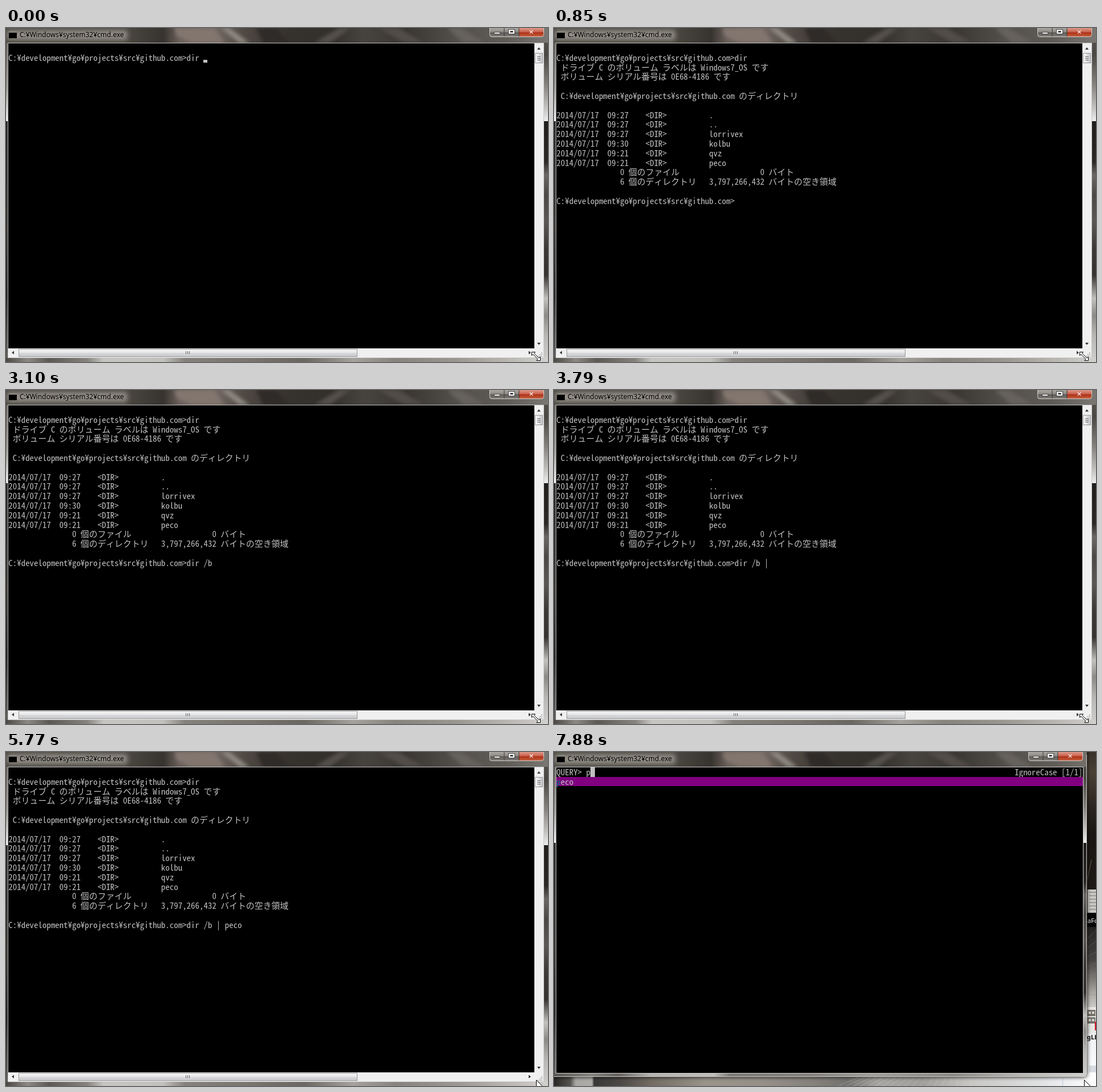
Animation of 953x588 px, one loop 8000 ms. Source, as an HTML page with a canvas:

```html
<!DOCTYPE html>
<html lang="ja">
<head>
<meta charset="utf-8">
<style>
html, body { margin: 0; width: 100%; height: 100%; overflow: hidden; background: #000; }
canvas { display: block; }
</style>
</head>
<body>
<canvas id="stage" width="953" height="588"></canvas>
<script>
const g = document.getElementById('stage').getContext('2d');
const CELL = 7.46, ROW = 16.8, LEFT = 4.3, TOP = 27, GREY = '#c0c0c0';
const PROMPT = 'C:¥development¥go¥projects¥src¥github.com>';
const NAMES = ['lorrivex', 'kolbu', 'qvz', 'peco'];

const entry = (time, name) => `2014/07/17  ${time}    <DIR>          ${name}`;
const LISTING = [
  ' ドライブ C のボリューム ラベルは Windows7_OS です',
  ' ボリューム シリアル番号は 0E68-4186 です',
  '',
  ' ' + PROMPT.slice(0, -1) + ' のディレクトリ',
  '',
  entry('09:27', '.'),
  entry('09:27', '..'),
  ...['09:27', '09:30', '09:21', '09:21'].map((time, i) => entry(time, NAMES[i])),
  '               0 個のファイル                   0 バイト',
  '               6 個のディレクトリ   3,797,266,432 バイトの空き領域'
];

// time, typed text, caret shown
const TYPING = [
  [0, 'dir ', 1], [410, 'dir ', 0], [850, '', 0], [1560, '', 1],
  [1970, 'd', 1], [2120, 'di', 0], [2240, 'dir', 0], [2540, 'dir ', 1],
  [2950, 'dir /', 0], [3100, 'dir /b', 0], [3660, 'dir /b ', 1],
  [3790, 'dir /b |', 0], [4070, 'dir /b | ', 1], [4220, 'dir /b | pe', 0],
  [4470, 'dir /b | pec', 0], [4620, 'dir /b | peco', 1], [5180, 'dir /b | peco', 0]
];

function rect(color, x, y, w, h) {
  g.fillStyle = color;
  g.fillRect(x, y, w, h);
}

function frame(color, x, y, w, h) {
  g.strokeStyle = color;
  g.lineWidth = 1;
  g.strokeRect(x + .5, y + .5, w - 1, h - 1);
}

// Stops are "offset color" pairs, offsets in percent.
function gradient(x0, y0, x1, y1, stops) {
  const fill = g.createLinearGradient(x0, y0, x1, y1);
  for (const stop of stops.split(', ')) {
    const [at, color] = stop.split(' ');
    fill.addColorStop(at / 100, color);
  }
  return fill;
}
const across = (w, stops) => gradient(0, 0, w, 0, stops);
const down = (y, h, stops) => gradient(0, y, 0, y + h, stops);

function poly(color, points, outline) {
  g.beginPath();
  for (let i = 0; i < points.length; i += 2) g.lineTo(points[i], points[i + 1]);
  g.closePath();
  g.fillStyle = color;
  g.fill();
  if (!outline) return;
  g.strokeStyle = outline;
  g.lineWidth = 1;
  g.stroke();
}

function line(color, ...p) {
  g.beginPath();
  g.moveTo(p[0], p[1]);
  g.lineTo(p[2], p[3]);
  g.strokeStyle = color;
  g.lineWidth = 1;
  g.stroke();
}

function label(text, x, y, font, color) {
  g.font = font;
  g.fillStyle = color;
  g.fillText(text, x, y);
}

// Console text: one cell per Latin character, two per Japanese one.
function print(text, row, col = 0, color = GREY) {
  g.font = '300 14.9px "Noto Sans Mono CJK JP", "Noto Sans Mono", monospace';
  g.fillStyle = color;
  for (const ch of text) {
    g.fillText(ch, LEFT + col * CELL, Math.round(TOP + row * ROW + 14));
    col += ch.charCodeAt(0) < 256 ? 1 : 2;
  }
}

function caption(right) {
  rect(across(953, '0 #4a4741, 22 #4b4741, 29 #37332e, 32 #6b605b, 39 #716661, 44 #4f4843, 52 #36322e, 60 #33302c, 66 #47433e, 74 #3a3632, 84 #55514c, 92 #5f5b56, 100 #7a7773'), 0, 0, right, 26);
  g.save();
  g.beginPath();
  g.rect(0, 0, right, 26);
  g.clip();
  g.filter = 'blur(3px)';
  poly('#83766f', [296, 0, 366, 0, 384, 26, 325, 26, 300, 14]);
  poly('#8f8983', [378, 0, 392, 0, 428, 26, 410, 26]);
  poly('#2f2b28', [440, 0, 475, 0, 498, 26, 452, 26]);
  poly('#55504b', [586, 0, 605, 0, 570, 26, 542, 26]);
  poly('#524d48', [655, 0, 690, 0, 735, 26, 700, 26]);
  poly('#66625d', [775, 0, 800, 0, 842, 26, 805, 26]);
  g.filter = 'blur(5px)';
  rect('#96928b', 2, 4, 211, 17);
  g.restore();
  rect('#b4b1ac', 5, 7, 14, 1);
  rect('#000', 5, 8, 14, 10);
  label('C:¥Windows¥system32¥cmd.exe', 24, 16, '12px "Noto Sans", "Open Sans", sans-serif', '#000');
}

function buttons(x) {
  const glass = down(0, 16, '0 #aaa6a2, 45 #8c8884, 50 #5c5855, 100 #85817d');
  const red = down(0, 16, '0 #dc9a8b, 45 #c9604b, 50 #ad2e16, 100 #c96a46');
  g.beginPath();
  g.roundRect(x, -5, 96, 21, 4);
  g.fillStyle = glass;
  g.fill();
  rect(red, x + 52, 0, 43, 15);
  g.strokeStyle = '#d2cecb';
  g.lineWidth = 1;
  g.beginPath();
  g.roundRect(x + .5, -5, 95, 20.5, 4);
  g.stroke();
  line('#3d3936', x + 26, 0, x + 26, 15);
  line('#3d3936', x + 52, 0, x + 52, 15);
  rect('#444', x + 8, 7, 11, 4);
  rect('#fff', x + 9, 8, 9, 2);
  frame('#444', x + 33, 2, 12, 9);
  frame('#fff', x + 34, 3, 10, 7);
  frame('#fff', x + 35, 4, 8, 5);
  rect('#444', x + 37, 5, 4, 3);
  label('✕', x + 69, 11, 'bold 11px "DejaVu Sans", sans-serif', '#fff');
}

function windowGlass(right, bottom, seam) {
  const cut = seam / bottom * 100;
  rect(down(0, bottom, `0 #5b5753, 8 #4a4743, 17 #85827e, 24 #c4c3c1, ${cut} #eeeeee, ${cut} #201e1c, 40 #2b2826, 44 #6a6764, 50 #4b4845, 58 #5a5754, 66 #3b3836, 74 #35322f, 81 #c2c1bf, 86 #8c8a87, 92 #b8b6b4, 100 #d0cfcd`), 0, 0, right, bottom);
  rect(down(0, bottom, `0 #55514d, 18 #97948f, ${cut} #ececec, ${cut} #2b2927, 60 #3b3835, 80 #2a2826, 100 #666360`), 0, 0, 4, bottom);
  caption(right);
}

function pointer() {
  poly('#fff', [932.5, 577.5, 932.5, 595, 936.5, 591, 944.5, 589.5], '#000');
}

function resizePointer() {
  poly('#fff', [924.5, 570.5, 930.5, 570.5, 928.7, 572.8, 936.8, 580.9, 939.5, 579, 939.5, 585.5, 933, 585.5, 935, 582.7, 926.8, 574.6, 924.5, 576.5], '#000');
}

function scrollbars() {
  rect('#f0f0f0', 929, 27, 16, 537);
  rect('#f0f0f0', 4, 564, 941, 16);
  const bar = '0 #f6f6f6, 45 #e9e9eb, 50 #d9dadc, 100 #c6c7ca';
  rect(gradient(930, 0, 944, 0, bar), 930, 44, 14, 18);
  frame('#979797', 930, 44, 14, 18);
  rect(down(565, 14, bar), 22, 565, 596, 14);
  frame('#979797', 22, 565, 596, 14);
  for (let i = 0; i < 3; i++) {
    rect('#666', 934, 50 + i * 3, 6, 1);
    rect('#666', 316 + i * 3, 569, 1, 5);
    for (let j = 0; j <= i; j++) rect('#b5b5b5', 941 - j * 3, 571 + i * 3, 2, 2);
  }
  poly('#333', [937, 34, 940, 38, 934, 38]);
  poly('#333', [934, 554, 940, 554, 937, 558]);
  poly('#333', [10, 571.5, 14, 568.5, 14, 574.5]);
  poly('#333', [923, 571.5, 919, 568.5, 919, 574.5]);
}

function shell(t) {
  windowGlass(953, 588, 164);
  rect(across(953, '0 #4b4844, 4 #8c8984, 8 #5c5955, 15 #87847f, 18 #c6c5c1, 29 #c2c1bd, 33 #85817c, 45 #79746d, 55 #6a6660, 64 #a5a29d, 72 #87837d, 83 #9a9690, 100 #d2d0cd'), 0, 580, 953, 8);
  buttons(850);
  rect('#c8c8c8', 3, 26, 943, 555);
  rect('#000', 4, 27, 925, 537);
  scrollbars();

  const [time, typed, caret] = TYPING.findLast(step => step[0] <= t);
  const listed = time >= 850, row = listed ? 16 : 1;
  if (listed) {
    print(PROMPT + 'dir', 1);
    LISTING.forEach((text, i) => print(text, i + 2));
  }
  print(PROMPT + typed, row);
  if (caret) rect(GREY, Math.round(LEFT + (PROMPT.length + typed.length) * CELL), Math.round(TOP + row * ROW + 12.2), 7, 5);
  if (t < 5770) resizePointer(); else pointer();
}

function desktop() {
  rect(down(0, 588, '0 #38322a, 6 #4b4236, 16 #2c2721, 25 #191613, 41 #1d1a17, 48 #080808, 54 #2b2927, 62 #454341, 68 #7d7a76, 72 #aaa7a3, 77 #d0cfcd, 84 #f0f1f3, 100 #ffffff'), 930, 0, 23, 588);
  for (let i = 0; i < 7; i++) line('#8b888360', 937, 330 + i * 16, 953, 314 + i * 19);
  line('#6a5d4c', 938, 224, 945, 190);
  rect('#c9c8c5', 938, 242, 15, 41);
  for (let y = 246; y < 282; y += 6) rect('#9b9a98', 941, y, 12, 2);
  rect('#050505', 937, 284, 16, 24);
  label('aFo', 938, 301, '11px "Noto Sans", sans-serif', '#fff');
  rect('#e8e6e3', 937, 449, 16, 46);
  for (const [x, y] of [[938, 454], [944, 454], [938, 467], [944, 467]]) {
    rect('#77736d', x, y, 8, 11);
    rect('#d7d4ce', x + 2, y + 3, 4, 4);
  }
  rect('#d4142c', 951, 475, 2, 15);
  label('gLb', 937, 506, 'bold 11px "Noto Sans", sans-serif', '#111');
  rect('#d8dce2', 941, 552, 12, 12);
  rect(across(953, '0 #2a2826, 3 #55524e, 4 #a8a7a4, 7 #aeaca8, 7.4 #3a3937, 12 #4a4744, 18 #736c63, 28 #99938a, 38 #969089, 48 #85817c, 54 #74726f, 60 #a6a5a2, 68 #a19f9b, 77 #c8c7c4, 88 #dcdddd, 94 #eceef0, 100 #ffffff'), 0, 565, 953, 23);
  for (let i = 0; i < 22; i++) line('#dddcda50', 500 + i * 13, 588, 535 + i * 11, 573);
  rect('#bdcbe0', 894, 573, 1, 15);
}

function picker(query) {
  desktop();
  g.save();
  g.shadowColor = '#000';
  g.shadowBlur = 7;
  g.beginPath();
  g.roundRect(-9, -9, 946, 581, 6);
  g.fillStyle = '#333';
  g.fill();
  g.restore();
  g.save();
  g.clip();
  windowGlass(937, 572, 160);
  rect(across(937, '0 #5a5753, 7 #85827e, 12 #65625e, 18 #b5b3af, 30 #bfbdb9, 33 #7d7a76, 48 #85827d, 60 #a09e9a, 75 #8c8985, 88 #b8b6b3, 100 #d0cfcd'), 0, 565, 937, 7);
  g.restore();
  line('#c8c6c3', 936.5, 5, 936.5, 568);
  line('#c8c6c3', 0, 571.5, 934, 571.5);
  buttons(834);
  rect('#d0d0d0', 3, 26, 928, 540);
  rect('#000', 4, 27, 926, 538);

  print('QUERY> ' + query, 0);
  rect(GREY, Math.round(LEFT + (7 + query.length) * CELL), 27, 8, 17);
  print('IgnoreCase [1/1]', 0, 108);
  rect('#800080', 4, 44, 926, 16);
  NAMES.filter(name => name.includes(query)).forEach((name, i) => {
    print(query, i + 1, 0, '#008080');
    print(name.slice(query.length), i + 1, query.length);
  });
  pointer();
}

function draw() {
  const t = performance.now() % 8000;
  if (t < 5890) shell(t);
  else picker(t < 7880 ? '' : 'p');
  requestAnimationFrame(draw);
}
draw();
</script>
</body>
</html>
```
